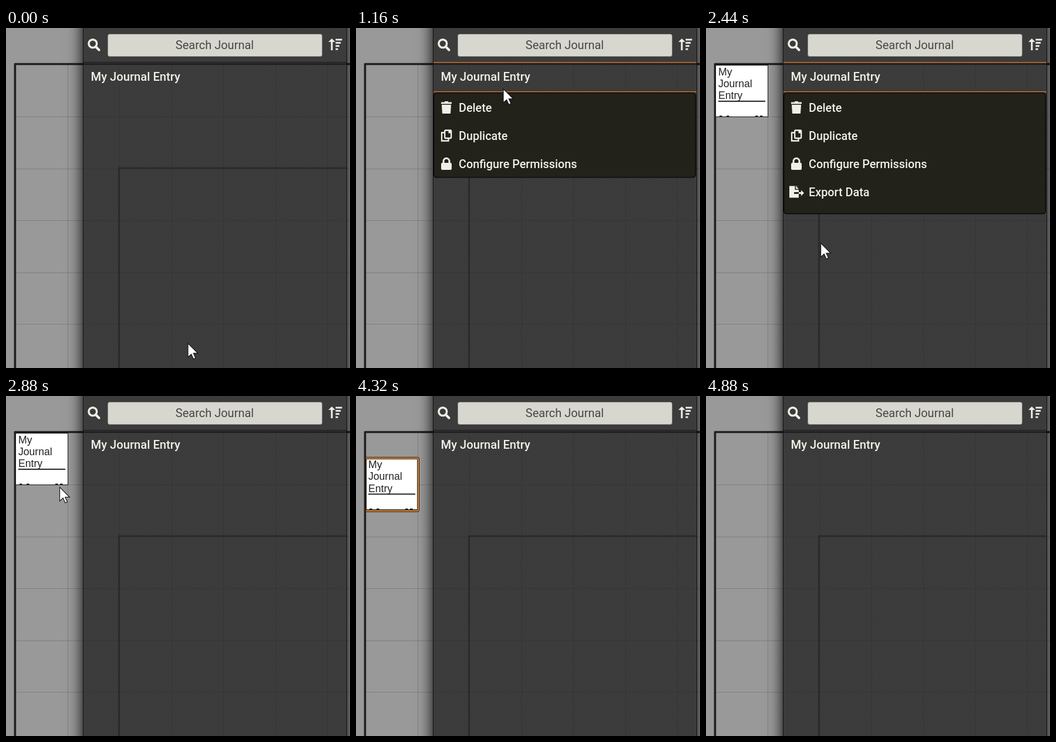
These frames come from a looping animation (586x580 px, 5 s). An HTML page with a canvas:

```html
<!DOCTYPE html>
<html lang="en">
<head>
<meta charset="utf-8">
<title>Journal sidebar</title>
<style>
  html, body { margin: 0; width: 100%; height: 100%; overflow: hidden; background: #999; }
  canvas { display: block; }
</style>
</head>
<body>
<canvas id="stage" width="586" height="580"></canvas>
<script>
const W = 586, H = 580, LOOP = 5000, STEP = 40;
const ctx = document.getElementById('stage').getContext('2d');
const UI_FONT = 'Roboto, "Noto Sans", sans-serif';
const TOKEN_FONT = '17.6px "Liberation Sans", Arial, sans-serif';
const LIGHT = '#f0f0e8', DARK = '#22211a', ORANGE = '#d56e20';
const CELL = 88.5, ROW = 48;
const panel = { x: 131, w: 450 };
const menu = { x: 132, y: 110, w: 447, h: 291, open: 1060, close: 2368, slide: 200 };
const token = { shown: 2400, selected: 2960, moves: 3375, top: 64, reach: 430, speed: 0.955 };
const CURSOR_HIDDEN = 3120;

const cursorStart = { x: 310, y: 538 };
const cursorMoves = [
  { from: 40, to: 700, x: 251, y: 104 },
  { from: 1220, to: 1900, x: 197, y: 370 },
  { from: 2400, to: 3050, x: 70, y: 112 }
];

const clamp = p => Math.min(1, Math.max(0, p));
const smooth = p => clamp(p) ** 2 * (3 - 2 * clamp(p));
const swing = p => 0.5 - Math.cos(Math.PI * clamp(p)) / 2;

function cursorAt(t) {
  let { x, y } = cursorStart;
  for (const move of cursorMoves) {
    const p = smooth((t - move.from) / (move.to - move.from));
    x += (move.x - x) * p;
    y += (move.y - y) * p;
  }
  return { x, y };
}

// Down, back up, then down and off the stage
function tokenTop(t) {
  const { top, reach, speed, moves } = token;
  const d = speed * Math.max(0, t - moves);
  return top + (d < 2 * reach ? reach - Math.abs(reach - d) : d - 2 * reach);
}

function rect(g, color, x, y, w, h) {
  g.fillStyle = color;
  g.fillRect(x, y, w, h);
}

function roundRect(x, y, w, h, r) {
  const path = new Path2D();
  path.roundRect(x, y, w, h, r);
  return path;
}

function stroke(g, color, width, path) {
  g.strokeStyle = color;
  g.lineWidth = width;
  g.stroke(path);
}

function trace(...points) {
  const path = new Path2D();
  points.forEach(([x, y]) => path.lineTo(x, y));
  return path;
}

function text(g, str, x, y, font, color, align = 'left') {
  g.font = font;
  g.fillStyle = color;
  g.textAlign = align;
  g.fillText(str, x, y);
}

// Arrow of the given length pointing right, its tip at x, y after turning
function arrow(g, color, x, y, length, head, angle = 0) {
  g.save();
  g.translate(x, y);
  g.rotate(angle);
  stroke(g, color, 3, trace([-length, 0], [1 - head, 0]));
  g.fillStyle = color;
  g.fill(trace([0, 0], [-head, -head], [-head, head]));
  g.restore();
}

function drawGrid(g, color) {
  for (let k = 0; k < 6; k++) {
    rect(g, color, Math.round(104.5 + k * CELL), 62, 1, H);
    rect(g, color, 16, Math.round(151 + k * CELL), W, 1);
  }
}

function weave() {
  const tile = document.createElement('canvas');
  tile.width = tile.height = 4;
  const g = tile.getContext('2d');
  for (let i = 0; i < 4; i++) {
    rect(g, 'rgba(0,0,0,.13)', i, i, 1, 1);
    rect(g, 'rgba(255,255,255,.03)', (i + 2) % 4, i, 1, 1);
  }
  return g.createPattern(tile, 'repeat');
}

function drawPanel(g) {
  g.save();
  g.shadowColor = '#000';
  g.shadowBlur = 24;
  rect(g, '#3c3c3c', panel.x, -40, panel.w, H + 80);
  g.restore();

  g.save();
  g.beginPath();
  g.rect(panel.x, 0, panel.w, H);
  g.clip();
  rect(g, weave(), 0, 0, W, H);
  drawGrid(g, 'rgba(0,0,0,.1)');
  stroke(g, 'rgba(0,0,0,.27)', 3, trace([192.5, H], [192.5, 239], [W, 239]));
  rect(g, 'rgba(0,0,0,.45)', 0, 60, W, 3);
  rect(g, '#161616', 0, 58, W, 1);
  g.restore();
  rect(g, '#111', panel.x, 0, 1, H);
  rect(g, '#111', panel.x + panel.w - 1, 0, 1, H);
}

function drawSearchBar(g) {
  const field = roundRect(173.5, 10.5, 365, 38, 3);
  g.fillStyle = '#d7d7cf';
  g.fill(field);
  stroke(g, '#85857e', 1, field);
  text(g, 'Search Journal', 355.5, 36, '20px ' + UI_FONT, '#484844', 'center');

  const lens = new Path2D();
  lens.arc(147.8, 26.6, 6.9, 0, 7);
  stroke(g, LIGHT, 3.4, lens);
  g.lineCap = 'round';
  stroke(g, LIGHT, 4, trace([153.5, 32.5], [158.5, 37.5]));
  g.lineCap = 'butt';
  arrow(g, LIGHT, 555, 18, 20, 5.8, -Math.PI / 2);
  for (let i = 0; i < 4; i++) rect(g, LIGHT, 561.5, 18.5 + i * 5.4, 11 - i * 2.3, 2.8);
}

function drawBackdrop() {
  const layer = document.createElement('canvas');
  layer.width = W;
  layer.height = H;
  const g = layer.getContext('2d');
  rect(g, '#999', 0, 0, W, H);
  drawGrid(g, 'rgba(0,0,0,.17)');
  g.lineJoin = 'round';
  stroke(g, '#202020', 3.6, trace([15.4, H + 5], [15.4, 61.5], [W + 5, 61.5]));
  g.lineJoin = 'miter';
  drawPanel(g);
  drawSearchBar(g);
  text(g, 'My Journal Entry', 144.5, 90, '500 20.2px ' + UI_FONT, LIGHT);
  return layer;
}

// Icons are drawn around the origin in a box about 20 px wide
function filePage(g, x) {
  rect(g, LIGHT, x, -10, 16, 20);
  g.fillStyle = DARK;
  g.fill(trace([x + 9.5, -10], [x + 16, -10], [x + 16, -3.5], [x + 9.5, -3.5]));
  g.fillStyle = LIGHT;
  g.fill(trace([x + 11, -10], [x + 16, -5], [x + 11, -5]));
}

const icons = {
  trash(g) {
    rect(g, LIGHT, -9, -9, 18, 3);
    rect(g, LIGHT, -3, -10.5, 6, 2);
    g.fill(trace([-8, -4.5], [8, -4.5], [7, 10.5], [-7, 10.5]));
  },
  copy(g) {
    stroke(g, LIGHT, 2.3, roundRect(-2.8, -9, 11, 13.5, 1.5));
    stroke(g, LIGHT, 2.3, trace([-4, -5], [-8, -5], [-8, 9], [3.5, 9], [3.5, 5]));
    rect(g, LIGHT, 3.5, -9, 4, 5);
  },
  lock(g) {
    g.fill(roundRect(-9, -1.5, 18, 12, 2));
    stroke(g, LIGHT, 3, roundRect(-5, -9.2, 10, 14, 5));
  },
  fileOut(g) {
    filePage(g, -12);
    rect(g, DARK, -4, 0.5, 8, 3);
    arrow(g, LIGHT, 13, 2, 9, 5);
  },
  fileIn(g) {
    filePage(g, -5);
    rect(g, LIGHT, -11, 0.5, 6, 3);
    arrow(g, DARK, 5, 2, 10, 5);
  },
  code(g) {
    for (const s of [-1, 1]) stroke(g, LIGHT, 2.8, trace([6 * s, -6], [11.5 * s, 0], [6 * s, 6]));
    stroke(g, LIGHT, 2.6, trace([3, -10], [-3, 10]));
  }
};

const items = [
  ['trash', 'Delete'], ['copy', 'Duplicate'], ['lock', 'Configure Permissions'],
  ['fileOut', 'Export Data'], ['fileIn', 'Import Data'], ['code', 'to token']
];

function drawItem([icon, label], index) {
  const cy = 136 + index * ROW;
  ctx.save();
  text(ctx, label, 175, cy + 7, '500 19.8px ' + UI_FONT, LIGHT);
  ctx.translate(154, cy - 0.5);
  icons[icon](ctx);
  ctx.restore();
}

function drawGlowing(item, index) {
  ctx.save();
  ctx.shadowColor = '#f00018';
  ctx.shadowBlur = 9;
  drawItem(item, index);
  ctx.restore();
}

function hoveredRow(t) {
  const { y } = cursorAt(t - 60);
  const ready = t > menu.open + menu.slide && t < menu.close;
  return ready && y > 112 ? Math.floor((y - 112) / ROW) : -1;
}

function drawMenu(t) {
  const shown = swing((t - menu.open) / menu.slide) - swing((t - menu.close) / menu.slide);
  if (shown <= 0) return;
  for (const y of [58, 108]) rect(ctx, ORANGE, 132, y, 448, 1.4);
  const h = Math.max(2, menu.h * shown);
  const box = roundRect(menu.x + 0.5, menu.y + 0.5, menu.w - 1, h - 1, 5);
  const hovered = hoveredRow(t);
  ctx.save();
  ctx.clip(box);
  rect(ctx, DARK, menu.x, menu.y, menu.w, h);
  items.forEach((item, i) => {
    if (i === hovered) drawGlowing(item, i);
    drawItem(item, i);
  });
  ctx.restore();
  stroke(ctx, '#000', 1.2, box);
}

function drawToken(t) {
  const top = tokenTop(t);
  if (t < token.shown || top >= H) return;
  ctx.save();
  ctx.beginPath();
  ctx.rect(17, 0, 114, H);
  ctx.clip();
  ctx.translate(17, top);
  rect(ctx, '#111', -1, -1, 90, 89);
  rect(ctx, '#fff', 0, 0, 88, 87);
  ['My', 'Journal', 'Entry'].forEach((word, i) =>
    text(ctx, word, 4, 16.5 + i * 20.3, TOKEN_FONT, '#222'));
  rect(ctx, '#111', 4, 60, 80, 1.8);
  for (const x of [6, 18, 67, 75]) rect(ctx, '#111', x, 85.5, 4.5, 2);
  if (t >= token.selected) {
    const frame = roundRect(-1, -0.5, 90, 90, 2);
    stroke(ctx, '#2a1a0c', 4, frame);
    stroke(ctx, '#e0893a', 2, frame);
  }
  ctx.restore();
}

const pointer = trace([0, 0], [0, 16.8], [4, 13.1], [6.7, 19], [9.2, 17.9], [6.6, 12], [12, 12]);
pointer.closePath();

function drawCursor(t) {
  if (t >= CURSOR_HIDDEN) return;
  const { x, y } = cursorAt(t);
  ctx.save();
  ctx.translate(x, y);
  ctx.scale(1.4, 1.4);
  ctx.fillStyle = '#fff';
  ctx.fill(pointer);
  stroke(ctx, '#111', 0.8, pointer);
  ctx.restore();
}

const backdrop = drawBackdrop();

function render() {
  const t = Math.floor(performance.now() % LOOP / STEP) * STEP;
  ctx.drawImage(backdrop, 0, 0);
  drawMenu(t);
  drawToken(t);
  drawCursor(t);
  requestAnimationFrame(render);
}
render();
</script>
</body>
</html>
```
